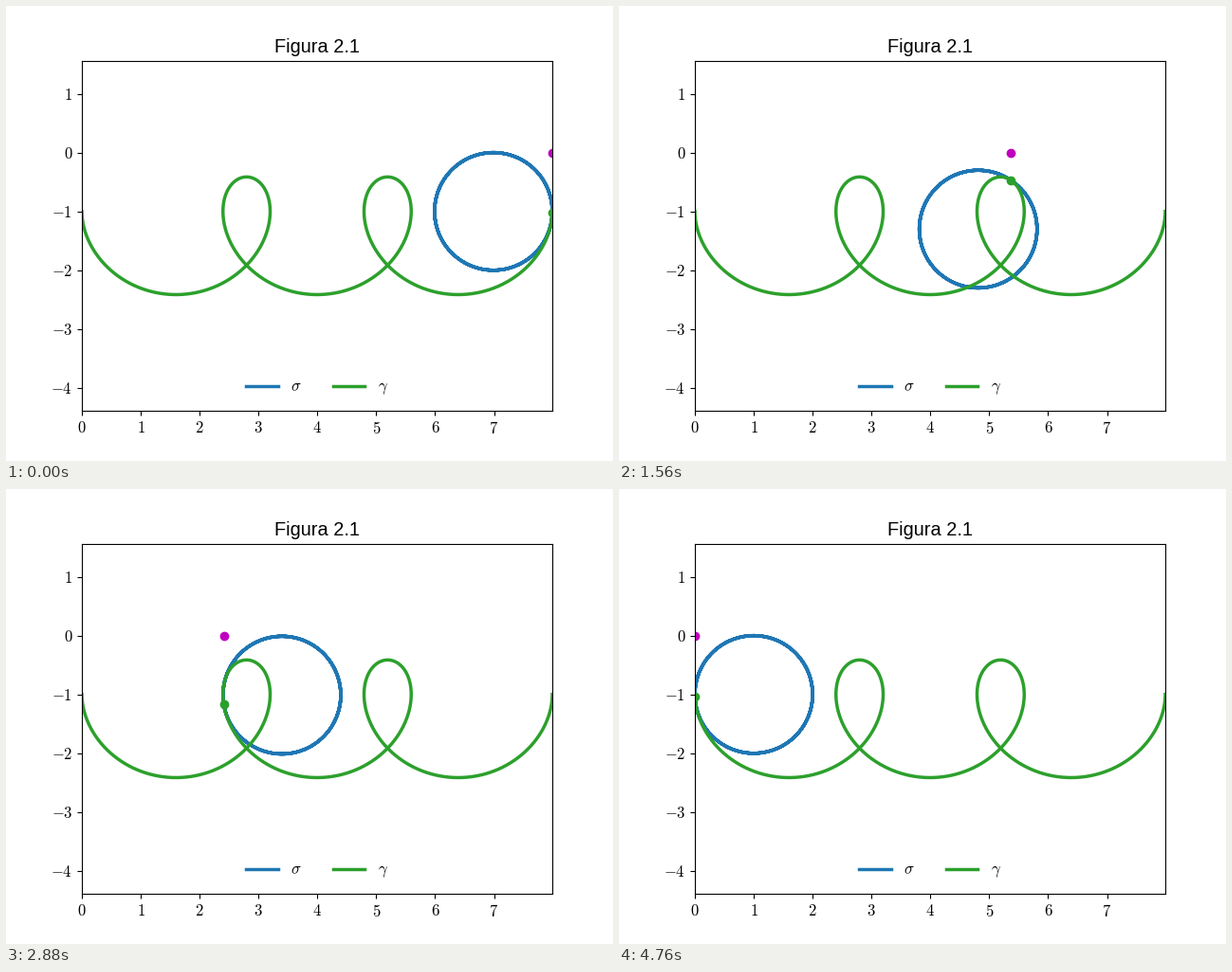
These frames come from a looping animation (640 px wide and 480 px high, 4800 ms). A matplotlib script:

```python
import numpy as np
import matplotlib.pyplot as plt
from matplotlib.animation import FuncAnimation

plt.rcParams.update({
    "font.family": "Liberation Sans",
    "mathtext.fontset": "cm",
    "font.size": 12,
})

FRAMES, INTERVAL = 120, 40
ROOT2 = np.sqrt(2)
START, END = -0.75 * np.pi, 4.75 * np.pi


def radius(s):
    """Distance of the nodary from its axis at arc length s."""
    return np.sqrt(3 + 2 * ROOT2 * np.cos(s))


def slope(s):
    """Unit tangent, with x measured from the right end."""
    r = radius(s)
    return (1 + ROOT2 * np.cos(s)) / r, ROOT2 * np.sin(s) / r


arc = np.linspace(START, END, 6000)
dx = slope(arc)[0]
run = np.concatenate([[0], np.cumsum((dx[1:] + dx[:-1]) / 2 * np.diff(arc))])
width = run[-1]


def arc_at(frame):
    """Arc length for a frame: 30 frames per wide arch, 15 per loop."""
    lap, step = divmod(frame + 0.27, 45)
    if step < 30:
        phi = np.radians(3 * step - 45)
        s = 2 * np.arctan((1 + ROOT2) ** 2 * np.tan(phi / 2))
    else:
        s = np.radians(135 + 6 * (step - 30))
    return s + 2 * np.pi * lap


fig = plt.figure(figsize=(6.4, 4.8), dpi=100, facecolor="white")
ax = fig.add_axes([0.125, 0.11, 0.775, 0.77])
half = width * 369.6 / 496 / 2
ax.set_xlim(0, width)
ax.set_ylim(-ROOT2 - half, -ROOT2 + half)
ax.set_xticks(range(8), [f"${v}$" for v in range(8)])
ax.set_yticks(range(-4, 2), [f"${v}$" for v in range(-4, 2)])
ax.set_title("Figura 2.1", fontsize=14.4)

turn = np.linspace(0, 8 * np.pi, 801)
circle, = ax.plot([], [], color="C0", lw=2.5, label=r"$\sigma$")
ax.plot(width - run, -radius(arc), color="C2", lw=2.5, label=r"$\gamma$")
axis_dot, = ax.plot([], [], "o", color="m")
curve_dot, = ax.plot([], [], "o", color="C2")
ax.legend(loc="lower center", ncol=2, frameon=False, fontsize=12)


def update(frame):
    s = arc_at(frame)
    tx, ty = slope(s)
    x, y = width - np.interp(s, arc, run), -radius(s)
    # the unit circle touches the curve, its centre lies along the normal
    circle.set_data(x + ty + np.cos(turn), y + tx + np.sin(turn))
    axis_dot.set_data([x], [0])
    curve_dot.set_data([x], [y])
    return circle, axis_dot, curve_dot


anim = FuncAnimation(fig, update, frames=FRAMES, interval=INTERVAL,
                     repeat=True, repeat_delay=0)
plt.show()
```
